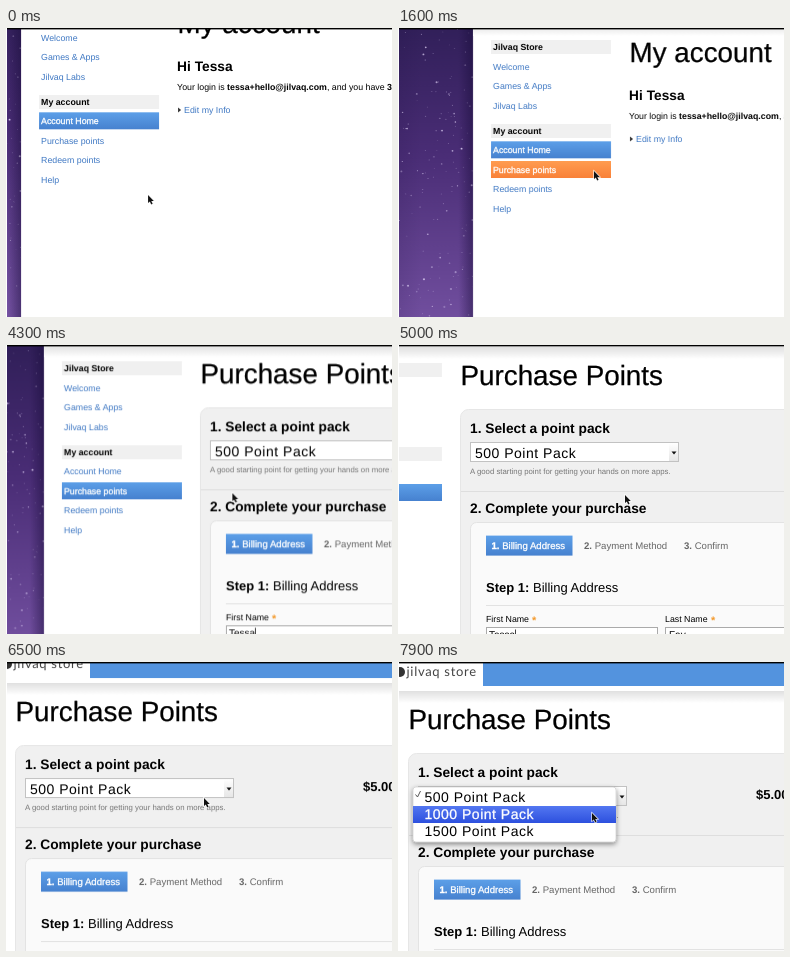
Write an HTML page that moves like this. It is 386 by 289 pixels and loops after 8000 ms.

```html
<!DOCTYPE html>
<html lang="en">
<head>
<meta charset="utf-8">
<title>Buying points</title>
<style>
  html, body { margin: 0; width: 100%; height: 100%; overflow: hidden; background: #fff; }
  svg { display: block; width: 386px; height: 289px; }
  text { font: 8.8px "Liberation Sans", Arial, sans-serif; fill: #000; text-rendering: geometricPrecision; white-space: pre; }
  .b { font-weight: 700; }
  .title { font-size: 27.8px; stroke: #000; stroke-width: .25px; }
  .h { font-size: 13.75px; font-weight: 700; }
  .step { font-size: 13px; }
  .tab { font-size: 9.6px; fill: #666; }
  .note { font-size: 7.8px; fill: #777; }
  .opt { font-size: 14px; letter-spacing: .5px; }
  .field { font-size: 10px; }
  .brand { font: 13px Lato, "Open Sans", sans-serif; letter-spacing: .7px; fill: #444; }
  .link { fill: #3f78c3; }
  .white { fill: #fff; stroke: #fff; stroke-width: .3px; }
  .star { fill: #f39a2d; font-size: 11px; }

  #page, #cursor { animation: pan 8s linear infinite; }
  #cursor { animation-name: point; }
  .show { animation: 8s step-end infinite; }
  #account { animation-name: account; }
  #purchase { animation-name: purchase; }
  #note { animation-name: note; }
  #overHelp { animation-name: overHelp; }
  #overRedeem { animation-name: overRedeem; }
  #overPurchase { animation-name: overPurchase; }
  #menu { animation-name: menu; }
  #pick500 { animation-name: pick500; }
  #pick1000 { animation-name: pick1000; }

  @keyframes pan {
    0% { transform: translate(-60px, -33px); }
    11.25% { transform: translate(1px, -22px); }
    20% { transform: translate(0, -4px); }
    30%, 48.75% { transform: translate(0, 0); }
    51.25%, 52.5% { transform: translate(-18px, 0); }
    62.5% { transform: translate(-169px, 2px); }
    63.75%, 65% { transform: translate(-172px, 2px); }
    67.5%, 68.75% { transform: translate(-176px, 2px); }
    81.25% { transform: translate(-222px, 21px); }
    91.25%, 92.5% { transform: translate(-222px, 27px); }
    98.75%, 100% { transform: translate(-221px, 29px); }
  }
  @keyframes point {
    0% { transform: translate(142px, 167px); }
    11.25% { transform: translate(195px, 135px); }
    20% { transform: translate(196px, 143px); }
    30%, 41.25% { transform: translate(196px, 147px); }
    47.5%, 48.75% { transform: translate(226px, 147px); }
    62.5%, 68.75% { transform: translate(227px, 150px); }
    81.25% { transform: translate(198px, 136px); }
    91.25%, 92.5% { transform: translate(195px, 136px); }
    98.75%, 100% { transform: translate(194px, 151px); }
  }
  @keyframes account { 0% { opacity: 1; } 38.7%, 100% { opacity: 0; } }
  @keyframes purchase { 0% { opacity: 0; } 38.7%, 100% { opacity: 1; } }
  @keyframes note { 0% { opacity: 0; } 39.9%, 100% { opacity: 1; } }
  @keyframes overHelp { 0% { opacity: 0; } 1.9% { opacity: 1; } 6.1%, 100% { opacity: 0; } }
  @keyframes overRedeem { 0% { opacity: 0; } 6.8% { opacity: 1; } 12.4%, 100% { opacity: 0; } }
  @keyframes overPurchase { 0% { opacity: 0; } 12.4% { opacity: 1; } 38.7%, 100% { opacity: 0; } }
  @keyframes menu { 0% { opacity: 0; } 93.7%, 100% { opacity: 1; } }
  @keyframes pick500 { 0% { opacity: 1; } 95.6%, 100% { opacity: 0; } }
  @keyframes pick1000 { 0% { opacity: 0; } 95.6%, 100% { opacity: 1; } }
</style>
</head>
<body>
<svg viewBox="0 0 386 289">
  <defs>
    <linearGradient id="sky" x2="0" y2="1">
      <stop stop-color="#291b50"/><stop offset=".45" stop-color="#4a2d76"/><stop offset="1" stop-color="#7c58aa"/>
    </linearGradient>
    <linearGradient id="edge">
      <stop stop-color="#150a35" stop-opacity=".12"/><stop offset=".35" stop-color="#150a35" stop-opacity="0"/>
      <stop offset=".82" stop-color="#150a35" stop-opacity="0"/><stop offset="1" stop-color="#150a35" stop-opacity=".45"/>
    </linearGradient>
    <linearGradient id="fade" x2="0" y2="1"><stop stop-color="#e0e0e0"/><stop offset="1" stop-color="#fff"/></linearGradient>
    <linearGradient id="blue" x2="0" y2="1"><stop stop-color="#5c9fe8"/><stop offset="1" stop-color="#4681cf"/></linearGradient>
    <linearGradient id="orange" x2="0" y2="1"><stop stop-color="#ff9c50"/><stop offset="1" stop-color="#f98138"/></linearGradient>
    <linearGradient id="pick" x2="0" y2="1"><stop stop-color="#5377f1"/><stop offset="1" stop-color="#2d50de"/></linearGradient>
    <linearGradient id="button" x2="0" y2="1"><stop stop-color="#fff"/><stop offset="1" stop-color="#e6e6e6"/></linearGradient>
    <filter id="shadow" x="-10%" y="-20%" width="120%" height="150%">
      <feDropShadow dx="0" dy="2" stdDeviation="2.5" flood-opacity=".45"/>
    </filter>
    <clipPath id="stage"><rect x="1" width="385" height="289"/></clipPath>
  </defs>

  <g clip-path="url(#stage)">
    <g id="page">
      <rect x="-4" y="-40" width="79" height="380" fill="url(#sky)"/>
      <g id="stars"></g>
      <rect x="-4" y="-40" width="79" height="380" fill="url(#edge)"/>
      <rect x="75" width="580" height="12" fill="url(#fade)"/>

      <rect x="93" y="16" width="120" height="14" fill="#f0f0f0"/>
      <rect x="93" y="100" width="120" height="14" fill="#f0f0f0"/>
      <text class="b" x="95" y="26">Jilvaq Store</text>
      <text class="b" x="95" y="110">My account</text>
      <g id="links"></g>

      <g id="account" class="show">
        <g id="onAccount"></g>
        <text class="title" x="231.5" y="37.7">My account</text>
        <text class="h" x="231" y="76">Hi Tessa</text>
        <text x="231" y="94.5">Your login is <tspan class="b">tessa+hello@jilvaq.com</tspan>, and you have <tspan class="b">350</tspan></text>
        <path d="M232 112.5l3 2.5-3 2.5z" fill="#333"/>
        <text class="link" x="238" y="117.5">Edit my Info</text>
      </g>
      <g id="overHelp" class="show"></g>
      <g id="overRedeem" class="show"></g>
      <g id="overPurchase" class="show"></g>

      <g id="purchase" class="show">
        <g id="onPurchase"></g>
        <rect x="306" y="-60" width="340" height="55" fill="#5393de"/>
        <circle cx="223" cy="-19" r="5" fill="#333"/>
        <text class="brand" x="229.5" y="-15">jilvaq store</text>
        <text class="title" x="231.5" y="37.7">Purchase Points</text>

        <rect x="231.5" y="62.5" width="420" height="300" rx="8" fill="#f0f0f0" stroke="#e6e6e6"/>
        <text class="h" x="241" y="86">1. Select a point pack</text>
        <rect x="241.5" y="95.5" width="208" height="19" fill="#fff" stroke="#c2c2c2"/>
        <rect x="440" y="96" width="9" height="18" fill="url(#button)"/>
        <path d="M442.5 104.5h5l-2.5 3z" fill="#111"/>
        <text class="opt" x="246" y="110.5">500 Point Pack</text>
        <text class="h" x="579" y="107.5" style="font-size:13px">$5.00</text>
        <text id="note" class="note show" x="241" y="126.5">A good starting point for getting your hands on more apps.</text>
        <path d="M232 144.5h420" stroke="#dedede"/>

        <text class="h" x="241" y="166">2. Complete your purchase</text>
        <rect x="241.5" y="175.5" width="400" height="180" rx="6" fill="#fafafa" stroke="#e3e3e3"/>
        <rect x="257" y="188.6" width="86.5" height="20" fill="url(#blue)"/>
        <text class="tab white" x="262.5" y="202"><tspan class="b">1.</tspan> Billing Address</text>
        <text class="tab" x="355" y="202"><tspan class="b">2.</tspan> Payment Method</text>
        <text class="tab" x="455" y="202"><tspan class="b">3.</tspan> Confirm</text>
        <text class="step" x="257" y="244.5"><tspan class="b">Step 1:</tspan> Billing Address</text>
        <path d="M257 258.5h390" stroke="#e2e2e2"/>
        <text x="257" y="275">First Name</text><text class="star b" x="303" y="277">*</text>
        <text x="436" y="275">Last Name</text><text class="star b" x="482" y="277">*</text>
        <rect x="257.5" y="280.5" width="171" height="17" fill="#fff" stroke="#aaa"/>
        <rect x="436.5" y="280.5" width="171" height="17" fill="#fff" stroke="#aaa"/>
        <text class="field" x="260" y="291">Tessa</text>
        <path d="M286.5 282.5v11" stroke="#111" stroke-width=".8"/>
        <text class="field" x="440" y="291">Fay</text>

        <g id="menu" class="show">
          <rect x="236" y="96" width="203" height="55" rx="3" fill="#fff" stroke="#bbb" stroke-width=".5" filter="url(#shadow)"/>
          <g id="options"></g>
          <g id="pick500" class="show"></g>
          <g id="pick1000" class="show"></g>
        </g>
      </g>
    </g>

    <rect x="1" width="385" height="1.4" fill="#000"/>
    <path id="cursor" d="M0 0V8L1.8 6.4 3.2 9.4 4.6 8.8 3.3 5.9H5.8Z" fill="#111" stroke="#fff" stroke-width="1.2" paint-order="stroke"/>
  </g>
</svg>
<script>
  const put = (id, markup) => document.getElementById(id).insertAdjacentHTML("beforeend", markup);

  // Sidebar: label and vertical centre
  const rows = [["Welcome", 42.5], ["Games &amp; Apps", 62], ["Jilvaq Labs", 82],
    ["Account Home", 126], ["Purchase points", 145.7], ["Redeem points", 165.3], ["Help", 185]];
  const label = ([name, y], cls) => `<text class="${cls}" x="95" y="${y + 3}">${name}</text>`;
  const bar = (id, row, fill) => put(id,
    `<rect x="93" y="${row[1] - 8.7}" width="120" height="17" fill="url(#${fill})"/>` + label(row, "white"));

  rows.forEach(row => put("links", label(row, "link")));
  bar("onAccount", rows[3], "blue");
  bar("onPurchase", rows[4], "blue");
  bar("overPurchase", rows[4], "orange");
  bar("overRedeem", rows[5], "orange");
  bar("overHelp", rows[6], "orange");

  // Point pack menu
  const option = (n, cls = "") => `<text class="opt ${cls}" x="247.5" y="${94 + n * 17}">${n * 500} Point Pack</text>`;
  const picked = n => `<rect x="236" y="${81 + n * 17}" width="203" height="17" fill="url(#pick)"/>` + option(n, "white");
  const tick = color => `<path d="M238.5 103.5l2 2.5 3-6" fill="none" stroke="${color}"/>`;
  put("options", option(1) + option(2) + option(3) + tick("#555"));
  put("pick500", picked(1) + tick("#fff"));
  put("pick1000", picked(2));

  // Seeded stars
  let seed = 11;
  const rnd = () => (seed = seed * 16807 % 2147483647) / 2147483647;
  for (let i = 0; i < 190; i++) {
    put("stars", `<circle cx="${rnd() * 78 - 3}" cy="${rnd() * 375 - 38}" r="${.4 + rnd() ** 3 * .7}" fill="#e2d4f8" opacity="${.3 + rnd() * .65}"/>`);
  }
</script>
</body>
</html>
```
